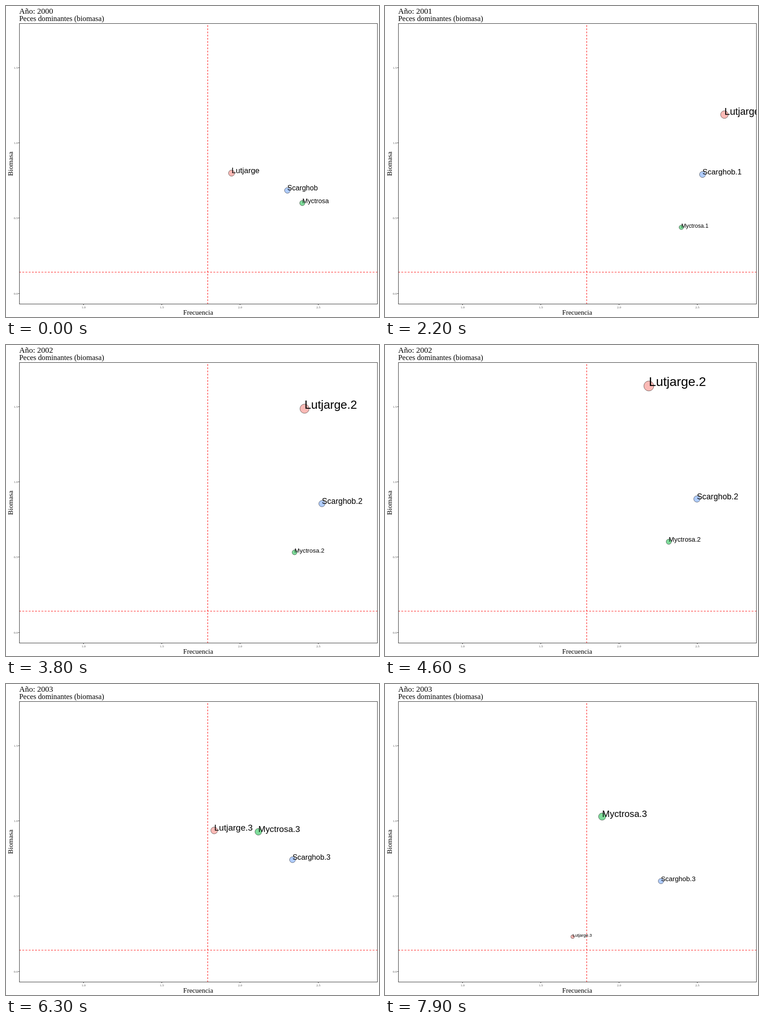
Write an HTML page that moves like this. It is 820 px wide and 683 px high and loops after 8000 ms.

```html
<!DOCTYPE html>
<html lang="es">
<head>
<meta charset="utf-8">
<title>Peces dominantes</title>
<style>
  html, body { margin: 0; width: 100%; height: 100%; overflow: hidden; background: #fff; }
  svg { display: block; }
  .serif { font-family: "Liberation Serif", "Times New Roman", serif; }
  .label { font-family: "Liberation Sans", Arial, sans-serif; }
  .tick { font-size: 7px; fill: #4d4d4d; }
  .limit { stroke: #f00; stroke-width: 1; stroke-dasharray: 4 3; }
</style>
</head>
<body>
<svg id="stage" width="820" height="683" viewBox="0 0 820 683">
  <clipPath id="panel"><rect x="29" y="38" width="788" height="617"/></clipPath>
  <g class="serif">
    <text id="year" x="29" y="16.6" font-size="17.5"></text>
    <text x="29" y="33" font-size="16.4">Peces dominantes (biomasa)</text>
    <text x="422.5" y="678" font-size="15" text-anchor="middle">Frecuencia</text>
    <text transform="translate(15 346.5) rotate(-90)" font-size="15.3" text-anchor="middle">Biomasa</text>
    <g id="axes"></g>
  </g>
  <g clip-path="url(#panel)">
    <g id="points"></g>
    <path class="limit" d="M29 584.5H816M443.5 655V38"/>
    <g id="labels"></g>
  </g>
  <rect x="29.5" y="38.5" width="787" height="616" fill="none" stroke="#333"/>
</svg>
<script>
const LOOP = 8000, STEP = 100, YEAR = 2500, FIRST_YEAR = 2000;

// One entry per year: [sightings, biomass, label size]; frequency is ln(sightings)
const species = [
  { name: "Lutjarge", fill: "#F8766D",
    keys: [[7, .799, 17], [16, 1.241, 22.1], [8, 1.713, 29.5], [5, .2195, 9.4], [9, .285, 10.2]] },
  { name: "Myctrosa", fill: "#00BA38",
    keys: [[11, .6, 14.4], [11, .4165, 11.9], [10, .6375, 14.8], [7, 1.195, 22.4], [5, .155, 8.5]] },
  { name: "Scarghob", fill: "#619CFF",
    keys: [[10, .684, 15.6], [13, .8045, 17], [12, .902, 17.9], [9, .594, 14.9], [14, .63, 14.7]] }
];

const byId = id => document.getElementById(id);
const scaleX = v => 170.4 + (v - 1) * 344.1;
const scaleY = v => 631 - v * 330.4;
const mix = (a, b, k) => a + (b - a) * k;

function set(node, attrs) {
  for (const key in attrs) node.setAttribute(key, attrs[key]);
  return node;
}

function add(parent, tag, attrs, text = "") {
  const node = set(document.createElementNS("http://www.w3.org/2000/svg", tag), attrs);
  node.textContent = text;
  return parent.appendChild(node);
}

const axes = byId("axes");
for (const v of [1, 1.5, 2, 2.5]) {
  const x = Math.floor(scaleX(v)) + .5;
  add(axes, "path", { d: `M${x} 655v2`, stroke: "#333" });
  add(axes, "text", { x, y: 663.5, class: "tick", "text-anchor": "middle" }, v.toFixed(1));
}
for (const v of [0, .5, 1, 1.5]) {
  const y = Math.floor(scaleY(v)) + .5;
  add(axes, "path", { d: `M27 ${y}h2`, stroke: "#333" });
  add(axes, "text", { x: 26, y: y + 2.3, class: "tick", "text-anchor": "end" }, v.toFixed(1));
}

for (const s of species) {
  s.dot = add(byId("points"), "circle",
    { fill: s.fill, "fill-opacity": .5, stroke: "#000", "stroke-opacity": .55, "stroke-width": 1 });
  s.label = add(byId("labels"), "text", { class: "label" });
}

function draw(time) {
  const years = Math.floor((time % LOOP) / STEP) * STEP / YEAR;
  const from = Math.floor(years), part = years - from;
  const nearest = Math.round(years);

  byId("year").textContent = `Año: ${FIRST_YEAR + nearest}`;
  for (const s of species) {
    const [n0, b0, size0] = s.keys[from], [n1, b1, size1] = s.keys[from + 1];
    const x = scaleX(mix(Math.log(n0), Math.log(n1), part));
    const y = scaleY(mix(b0, b1, part));
    const size = mix(size0, size1, part);
    set(s.dot, { cx: x, cy: y, r: size * .375 + .35 });
    set(s.label, { x, y: y + .4, "font-size": size });
    s.label.textContent = s.name + (nearest ? "." + nearest : "");
  }
}

const start = performance.now();
function tick() {
  draw(performance.now() - start);
  requestAnimationFrame(tick);
}
tick();
</script>
</body>
</html>
```
